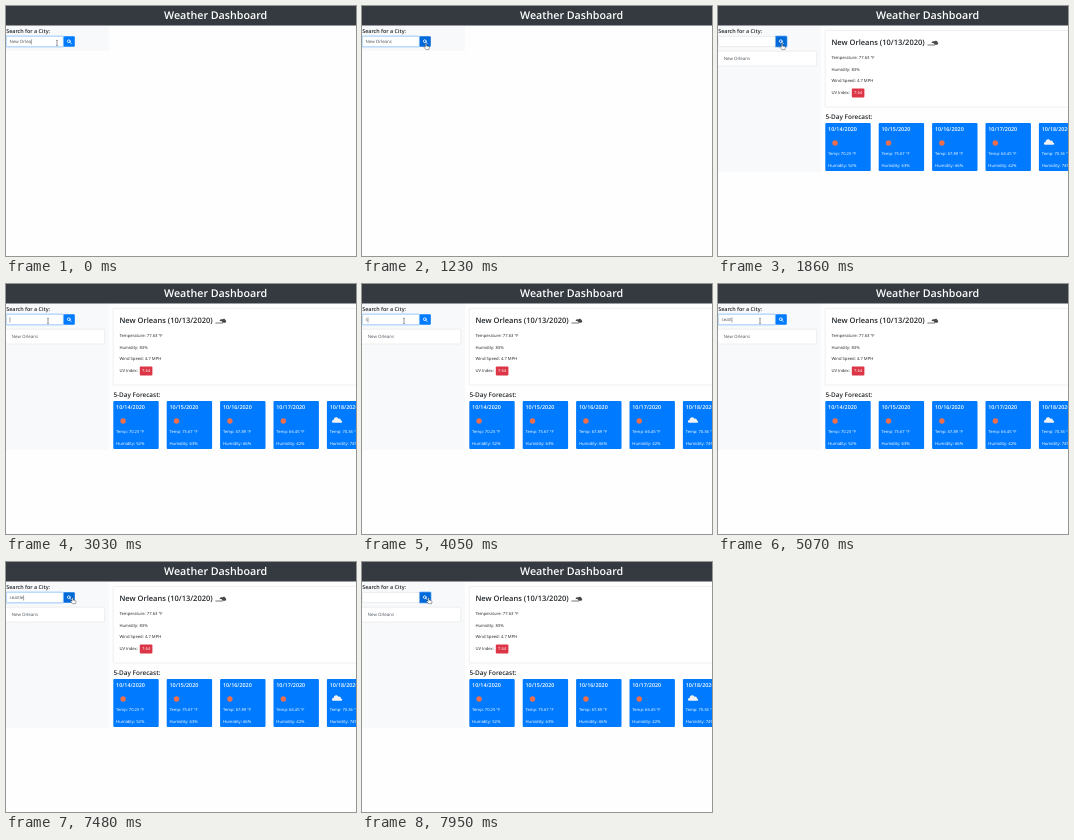
An HTML page that plays this animation: 350 px wide and 250 px high, repeating every 8 s.

```html
<!DOCTYPE html>
<html lang="en">
<head>
<meta charset="utf-8">
<title>Weather Dashboard</title>
<style>
  html, body { margin: 0; width: 100%; height: 100%; overflow: hidden; background: #fefefe; }
  svg { display: block; width: 100%; height: 100%; }
  text {
    font-family: "Open Sans", "Noto Sans", sans-serif;
    white-space: pre;
    text-rendering: geometricPrecision;
    fill: #212529;
  }
  .bold { font-weight: 600; }
  .white { fill: #fff; }
  .grey { fill: #495057; }
</style>
</head>
<body>
<svg id="stage" viewBox="0 0 350 250">
  <rect id="panel" y="19" width="103" fill="#f8f9fa"/>
  <rect width="350" height="19.5" fill="#343a40"/>
  <text class="bold white" x="158" y="12.8" font-size="10.7">Weather Dashboard</text>
  <text class="bold" x="0.2" y="26.6" font-size="5.4">Search for a City:</text>

  <rect id="buttonGlow" x="56.6" y="29.5" width="13" height="12" rx="1.5" fill="#268fff"/>
  <rect id="button" x="57.4" y="30.3" width="11.4" height="10.4" rx="0.9"/>
  <g fill="none" stroke="#fff" stroke-width="0.8" stroke-linecap="round">
    <circle cx="62.8" cy="35.2" r="1.4"/>
    <path d="M63.9 36.3 65.3 37.7"/>
  </g>

  <rect id="inputGlow" x="-0.6" y="29.4" width="58.7" height="12.2" rx="1.6" fill="#007bff"/>
  <rect id="input" x="0.4" y="30.4" width="56.8" height="10.2" rx="0.9" fill="#fff" stroke-width="0.4"/>
  <text id="typed" class="grey" x="3.6" y="37.4" font-size="4.4"></text>
  <path id="caret" d="M0 33.3v5.2" stroke="#495057" stroke-width="0.5"/>

  <g id="current">
    <rect x="-0.5" y="45.2" width="99.2" height="14.8" rx="1" fill="#fff" stroke="#dfdfdf" stroke-width="0.5"/>
    <text class="grey" x="5.8" y="54.4" font-size="4.4">New Orleans</text>
    <rect x="107.2" y="24.4" width="250" height="76.6" rx="1" fill="#fff" stroke="#dfdfdf" stroke-width="0.5"/>
    <text class="bold" x="113.4" y="39.2" font-size="7.5">New Orleans (10/13/2020)</text>
    <path d="M213.6 37.2c.2-1.7 1.7-2.2 2.6-1.6.5-1.4 3-1.2 3.1.4 1.3.2 1.2 2.5-.1 2.7h-2.4c-.5-1.2-1.8-1.9-3.2-1.5z" fill="#484848"/>
    <path d="M209.4 39h7.6" stroke="#555" stroke-width="0.8"/>
    <g id="readings"></g>
    <rect x="133.8" y="82.4" width="12.6" height="9" rx="1" fill="#dc3545"/>
    <text class="white" x="140.1" y="88.4" font-size="4.2" text-anchor="middle">7.64</text>
  </g>

  <g id="forecast">
    <text class="bold" x="107.4" y="113.2" font-size="6.4">5-Day Forecast:</text>
  </g>

  <path id="beam" d="M-.9-2.6h.7L0-2.4l.2-.2h.7M0-2.4v4.8M-.9 2.6h.7L0 2.4l.2.2h.7" fill="none" stroke="#333" stroke-width="0.5"/>
  <path id="hand" d="M-.6-.4c0-.8 1.2-.8 1.2 0v1.9l2.1.5c.6.2.8.6.7 1.2l-.5 1.9H-.1L-1.9 2.9c-.4-.6.3-1 .8-.7l.5.5z" fill="#fff" stroke="#222" stroke-width="0.4"/>
</svg>
<script>
const LOOP = 8000, BLINK = 530;
const CLICK = 1310, RESULTS = 1770, FORECAST = 1860;
const $ = id => document.getElementById(id);

function add(parent, tag, attrs, content = "") {
  const el = document.createElementNS("http://www.w3.org/2000/svg", tag);
  for (const key in attrs) el.setAttribute(key, attrs[key]);
  el.textContent = content;
  return parent.appendChild(el);
}

["Temperature: 77.63 °F", "Humidity: 83%", "Wind Speed: 4.7 MPH", "UV Index:"].forEach((line, i) =>
  add($("readings"), "text", { x: 113.4, y: 52.8 + i * 11.75, "font-size": 4.2 }, line));

const days = [[70.25, 52], [75.67, 63], [67.89, 66], [66.45, 42], [70.36, 74]];
days.forEach(([temp, humidity], i) => {
  const card = add($("forecast"), "g", { transform: `translate(${107.3 + i * 53.4} 117)` });
  const label = (y, size, content, cls) =>
    add(card, "text", { x: 2.8, y, "font-size": size, class: cls }, content);
  add(card, "rect", { width: 45.4, height: 48, rx: 1, fill: "#007bff" });
  label(8.2, 5.4, `10/${14 + i}/2020`, "bold white");
  if (i < 4) add(card, "circle", { cx: 9.8, cy: 20, r: 2.7, fill: "#ec6e4c" });
  else add(card, "path", {
    d: "M6.8 21.8c-2.4 0-2.2-2.9-.1-2.9.1-2.8 3.6-3.4 4.6-1.2 1.6-.6 2.8.4 2.7 1.7 1.8.2 1.7 2.4 0 2.4z",
    fill: "#f2f2f2"
  });
  label(32.4, 4.1, `Temp: ${temp} °F`, "white");
  label(43.6, 4.2, `Humidity: ${humidity}%`, "white");
});

// [time, content of the search box]
const keys = [
  [0, "New Orlea"], [70, "New Orlean"], [200, "New Orleans"], [1460, ""], [2960, ""],
  [3960, "s"], [4350, "se"], [4430, "sea"], [4830, "seat"], [5070, "seatt"],
  [5300, "seattl"], [5440, "seattle"], [5690, "seattle "], [6260, "seattle"], [7790, ""]
];

// [start, end, steps, x, y] of each pointer move
const moves = [
  [1070, 1230, 3, 64, 38.5],
  [2080, 2250, 3, 42, 37],
  [7170, 7480, 5, 66.6, 36.6]
];

const ramp = (t, a, b) => Math.min(1, Math.max(0, (t - a) / (b - a)));
const show = (id, on) => $(id).setAttribute("visibility", on ? "visible" : "hidden");
const mix = (a, b, k) => `rgb(${a.map((v, i) => Math.round(v + (b[i] - v) * k))})`;

function pointerAt(t) {
  let x = 51, y = 37;
  for (const [start, end, steps, toX, toY] of moves) {
    if (t < start) break;
    const k = (Math.floor(ramp(t, start, end) * (steps - 1)) + 1) / steps;
    x += (toX - x) * k;
    y += (toY - y) * k;
  }
  return [x, y];
}

function draw(t) {
  const [x, y] = pointerAt(t);
  const hover = x > 57;
  show("beam", !hover);
  show("hand", hover);
  $(hover ? "hand" : "beam").setAttribute("transform", `translate(${x} ${y})`);

  const focus = 1 - ramp(t, CLICK, CLICK + 150) + ramp(t, 2860, 3010) - ramp(t, 7610, 7760);
  $("inputGlow").setAttribute("opacity", 0.25 * focus);
  $("input").setAttribute("stroke", mix([206, 212, 218], [128, 189, 255], focus));
  $("buttonGlow").setAttribute("opacity", 0.5 * (1 - focus));
  $("button").setAttribute("fill", mix([0, 123, 255], [0, 105, 217], hover ? 1 : 1 - focus));

  const [since, value] = keys.filter(key => key[0] <= t).pop();
  const typed = $("typed");
  typed.textContent = value;
  const end = 3.9 + (value ? typed.getComputedTextLength() : 0);
  $("caret").setAttribute("transform", `translate(${end} 0)`);
  show("caret", focus > 0.5 && Math.floor((t - since) / BLINK) % 2 === 0);

  show("current", t >= RESULTS);
  show("forecast", t >= FORECAST);
  const bottom = t < RESULTS ? 45 : t < FORECAST ? 105 : 166;
  $("panel").setAttribute("height", bottom - 19);
}

const start = performance.now();
function tick() {
  draw((performance.now() - start) % LOOP);
  requestAnimationFrame(tick);
}
tick();
</script>
</body>
</html>
```
